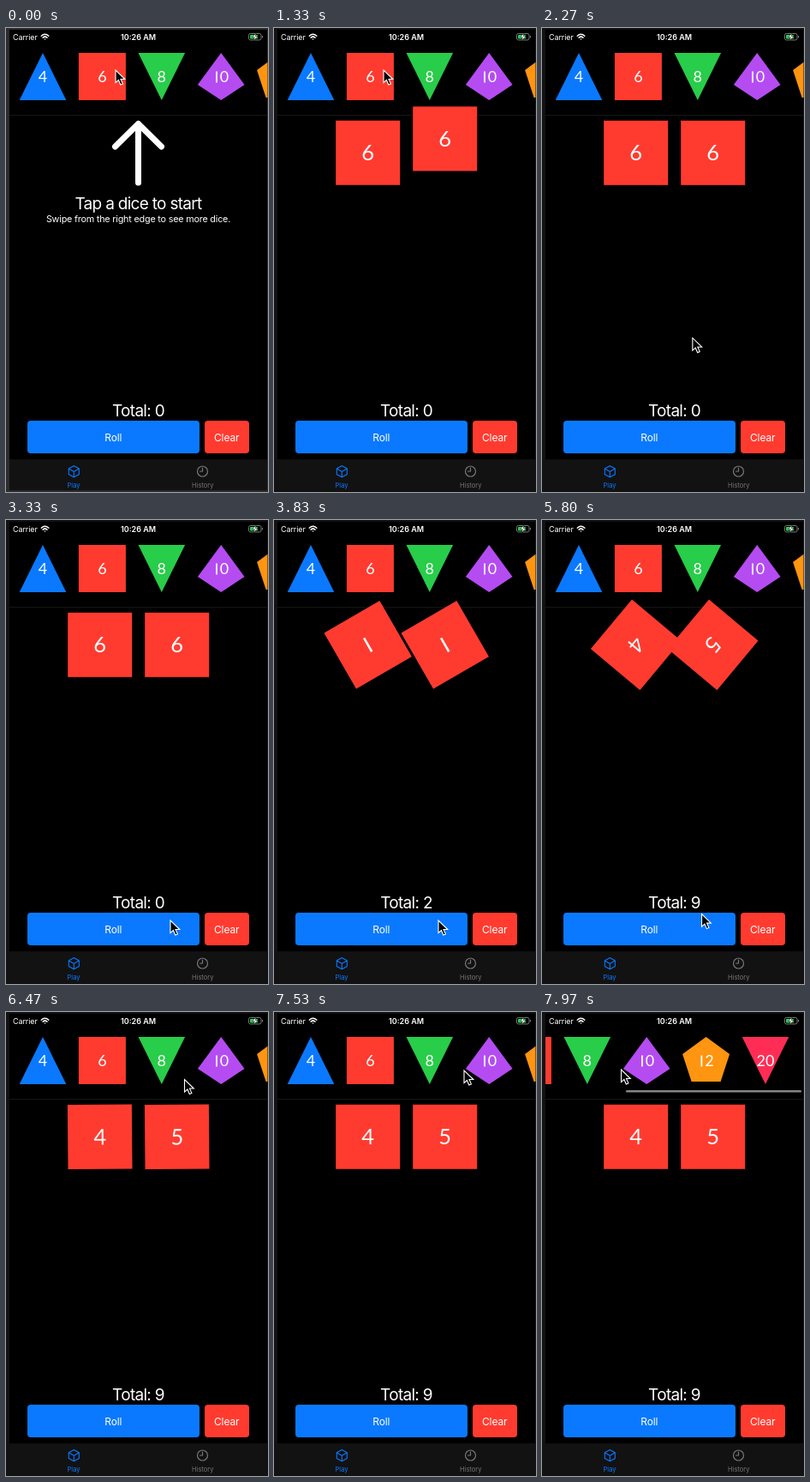
An HTML page for the animation above (8000 ms loop, 306 px wide and 540 px high).

```html
<!DOCTYPE html>
<html lang="en">
<head>
<meta charset="utf-8">
<title>Dice roller</title>
<style>
  html, body { margin: 0; width: 100%; height: 100%; overflow: hidden; background: #000; }
  svg { display: block; width: 306px; height: 540px; }
  text { font-family: Inter, Roboto, sans-serif; fill: #fff; text-anchor: middle; }
  .title { font-size: 19px; letter-spacing: -.7px; }
  .hint { font-size: 10.8px; letter-spacing: -.2px; }
  .button { font-size: 12px; letter-spacing: -.1px; }
  .status { font-size: 9px; }
  .tab { font-size: 7.5px; }
  .digit { font-family: Lato, "Open Sans", sans-serif; text-anchor: start; }
  .line { fill: none; stroke-linecap: round; stroke-linejoin: round; }
</style>
</head>
<body>
<svg viewBox="0 0 306 540">
  <defs><clipPath id="screen"><rect x="4" y="2" width="301.5" height="536"/></clipPath></defs>
  <rect id="frame" width="306" height="540"/>
  <rect x="4" y="2" width="301" height="536"/>

  <g clip-path="url(#screen)">
    <path d="M4 101.5H305" stroke="#151515"/>
    <g id="strip"></g>
    <rect id="scrollbar" y="91" width="205" height="2.4" rx="1.2" fill="#858585"/>
  </g>

  <text class="status" x="8" y="13.7" style="text-anchor:start;letter-spacing:-.1px">Carrier</text>
  <g class="line" stroke="#fff" stroke-width="1.5">
    <path d="M41.3 9.2Q45.5 5.4 49.8 9.2M43.1 11.2Q45.5 9 48 11.2M45.5 13V13.1"/>
  </g>
  <text class="status" x="154.5" y="13.7" font-weight="600">10:26 AM</text>
  <rect x="283.5" y="6.5" width="14.5" height="7.5" rx="2" fill="none" stroke="#777"/>
  <rect x="285" y="8" width="9" height="4.5" rx=".8" fill="#30d158"/>
  <path d="M299.5 9V11.5" stroke="#777"/>
  <path d="M292 5.8L287.5 10.8H290.3L289.5 14.8L294 9.6H291.2Z" fill="#fff" stroke="#000" stroke-width=".5"/>

  <g id="intro">
    <path class="line" d="M154.5 180V111.5M127.5 138L154.5 111.5L181.5 138" stroke="#fff" stroke-width="7"/>
    <text class="title" x="154.5" y="211">Tap a dice to start</text>
    <text class="hint" x="154.5" y="226.3">Swipe from the right edge to see more dice.</text>
  </g>
  <g id="dice"></g>

  <text class="title" id="total" x="154.5" y="452"></text>
  <g id="roll">
    <rect x="25" y="457" width="201" height="38" rx="4" fill="#0a79ff"/>
    <text class="button" x="125.3" y="480.5">Roll</text>
  </g>
  <rect x="232" y="457" width="52" height="38" rx="4" fill="#ff3b30"/>
  <text class="button" x="257.7" y="480.5">Clear</text>

  <rect x="4" y="502" width="301" height="36" fill="#121213"/>
  <path class="line" d="M79.3 509.5L85.3 512.8V519.5L79.3 522.8L73.3 519.5V512.8ZM73.5 513L79.3 516.2L85.1 513M79.3 516.2V522.6" stroke="#0a79ff" stroke-width="1.1"/>
  <text class="tab" x="79" y="534.8" style="fill:#0a79ff">Play</text>
  <g class="line" stroke="#777" stroke-width="1.2">
    <circle cx="229.5" cy="516" r="6"/><path d="M229.5 512V516H226.5"/>
  </g>
  <text class="tab" x="229.7" y="534.8" style="fill:#777">History</text>

  <path id="cursor" d="M0 0V14.6L3.4 11.5L5.8 17L8.4 15.9L6 10.5H10.8Z" fill="#000" stroke="#fff" stroke-width="1.1"/>
</svg>

<script>
const LOOP = 8000, MAX_SCROLL = 129, RED = '#ff3b30';
const $ = id => document.getElementById(id);
const clamp = (v, lo = 0, hi = 1) => Math.min(hi, Math.max(lo, v));
const smooth = p => p * p * (3 - 2 * p);

// Share of the way left for a critically damped spring, t ms after its start.
const springLeft = t => {
  const k = Math.max(0, t) * 0.0114;
  return (1 + k) * Math.exp(-k);
};

// A number centred on (x, y); the figure one is a plain bar.
function number(value, x, y, size) {
  const advance = c => size * (c === '1' ? 0.42 : 0.58);
  const chars = [...String(value)];
  let left = x - chars.reduce((sum, c) => sum + advance(c), 0) / 2;
  return chars.map(c => {
    const w = advance(c), bar = size * 0.1, h = size * 0.72;
    const mark = c === '1'
      ? `<rect x="${left + (w - bar) / 2}" y="${y - h / 2}" width="${bar}" height="${h}" fill="#fff"/>`
      : `<text class="digit" font-size="${size}" x="${left}" y="${y + h / 2}">${c}</text>`;
    left += w;
    return mark;
  }).join('');
}

const shapes = [
  [4, '#0a79ff', '0,29 27.3,84 -27.3,84'],
  [6, RED, '-27.5,29 27.5,29 27.5,84 -27.5,84'],
  [8, '#28cd49', '-27.3,29 27.3,29 0,84'],
  [10, '#b54cf2', '0,29 27.3,66 0,84 -27.3,66'],
  [12, '#ff9510', '0,29 27.5,49 17,81 -17,81 -27.5,49'],
  [20, '#ff2d55', '-27.3,29 27.3,29 0,84'],
];
$('strip').innerHTML = shapes.map(([sides, color, points], i) =>
  `<g transform="translate(${43 + i * 69.4})"><polygon points="${points}" fill="${color}"/>${number(sides, 0, 57, 18)}</g>`
).join('');

// Time, x, y of the pointer tip.
const pointer = [
  [0, 128, 49], [1700, 128, 49], [2550, 192, 466], [4250, 192, 466],
  [4950, 179.5, 445], [5150, 179.5, 445], [5450, 186, 468], [5740, 186, 468],
  [6400, 208.5, 78.5], [6750, 208.5, 78.5], [7250, 222, 68], [7530, 222, 68],
  [7920, 92.5, 67], [LOOP, 92.5, 67],
];
function pointerAt(t) {
  const i = pointer.findIndex(([time]) => time > t);
  const [t0, x0, y0] = pointer[i - 1], [t1, x1, y1] = pointer[i];
  const p = smooth((t - t0) / (t1 - t0));
  return [x0 + (x1 - x0) * p, y0 + (y1 - y0) * p];
}

const drops = [500, 1060];
const rolls = [{ at: 3470, faces: [1, 1] }, { at: 5690, faces: [4, 5] }];

function drawDice(t, roll) {
  const count = drops.filter(at => t >= at).length;
  const angle = roll ? -360 * springLeft(t - roll.at) : 0;
  $('dice').innerHTML = drops.slice(0, count).map((at, i) => {
    const x = count === 1 ? 154.5 : 109.7 + 90 * i;
    const y = 145.3 - 88 * springLeft(t - at);
    const face = roll ? roll.faces[i] : 6;
    const opacity = clamp((t - at) / 150);
    return `<g opacity="${opacity}" transform="translate(${x} ${y}) rotate(${angle})">
      <rect x="-37.5" y="-37.5" width="75" height="75" fill="${RED}"/>${number(face, 0, 0, 25.5)}</g>`;
  }).join('');
}

function draw(t) {
  const roll = rolls.filter(r => t >= r.at).pop();
  const [x, y] = pointerAt(t);
  const scroll = t > 7530 ? clamp(222 - x, 0, MAX_SCROLL) : 0;

  $('frame').setAttribute('fill', t < 200 ? '#2c2c2c' : '#121212');
  $('intro').setAttribute('opacity', 1 - clamp((t - drops[0]) / 200));
  $('strip').setAttribute('transform', `translate(${-scroll})`);
  $('scrollbar').setAttribute('x', 8 + 90 * scroll / MAX_SCROLL);
  $('scrollbar').setAttribute('opacity', clamp((t - 7540) / 80));
  $('total').textContent = 'Total: ' + (roll ? roll.faces[0] + roll.faces[1] : 0);
  $('roll').setAttribute('opacity', rolls.some(r => t >= r.at - 90 && t < r.at) ? 0.5 : 1);
  $('cursor').setAttribute('transform', `translate(${x} ${y})`);
  drawDice(t, roll);
}

const start = performance.now();
function tick() {
  draw((performance.now() - start) % LOOP);
  requestAnimationFrame(tick);
}
tick();
</script>
</body>
</html>
```
